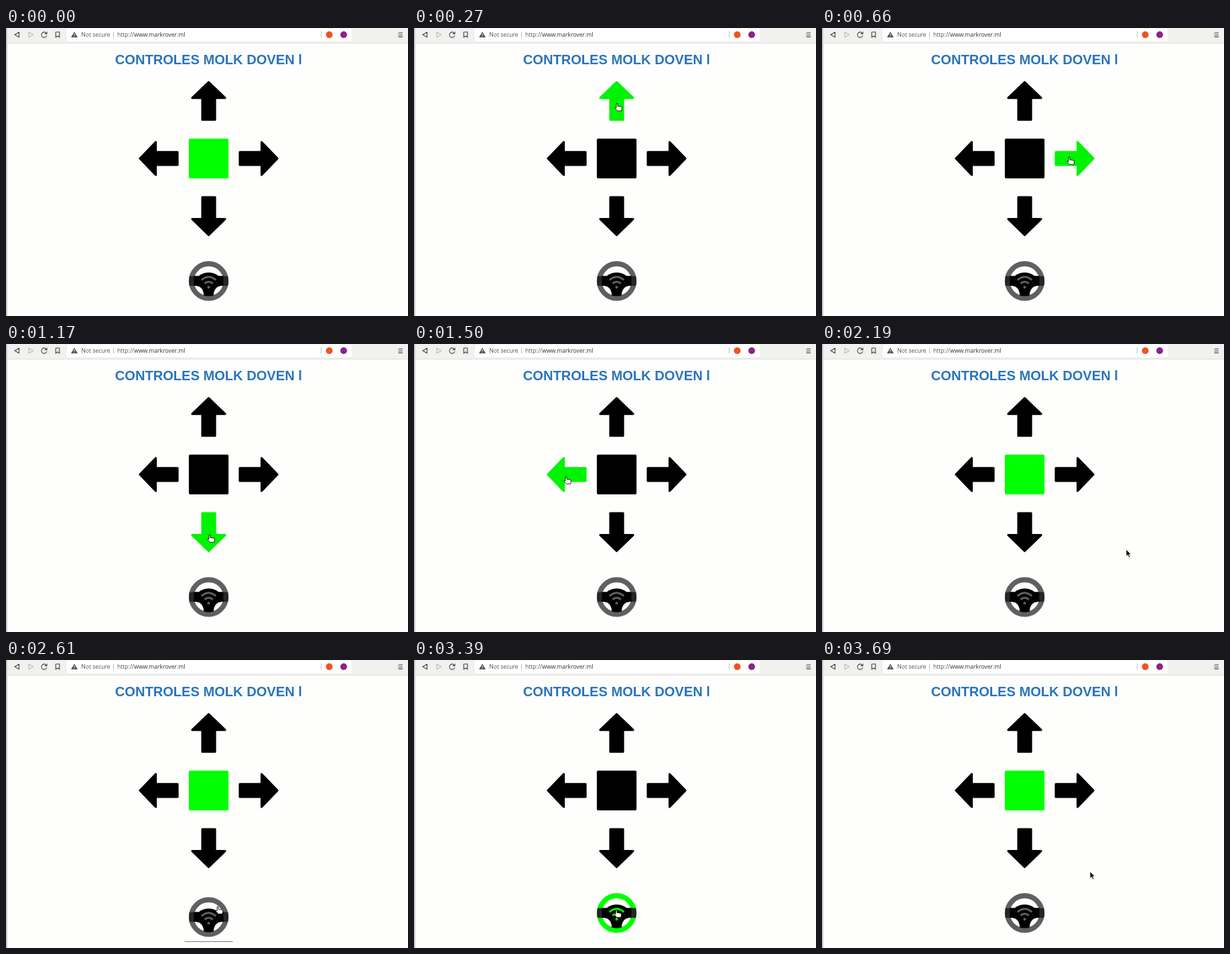
These frames come from a looping animation (600 px wide and 429 px high, 3900 ms). An HTML page:

```html
<!DOCTYPE html>
<html lang="es">
<head>
<meta charset="utf-8">
<title>Controles</title>
<style>
  html, body { margin: 0; width: 100%; height: 100%; overflow: hidden; background: #fefefd; }
  svg { display: block; width: 600px; height: 429px; }
  .bar { font: 8.6px "Open Sans", "Noto Sans", sans-serif; }
  .title { font: bold 20.1px "Liberation Sans", Arial, sans-serif; fill: #2a74bd; text-anchor: middle; }
  .icon { fill: none; stroke: #444; stroke-width: 1.1; stroke-linejoin: round; }
  .arrow { stroke: currentColor; stroke-width: 3; stroke-linejoin: round; }
  .btn { color: #000; fill: currentColor; }
  .btn.on { color: #00f300; }
  #wheel { color: #606060; }
  #stop.on, #wheel.on { color: #0f0; }
  .line { stroke: #777; visibility: hidden; }
  .hover .line { visibility: visible; }
  .hover .face { transform: translateY(6px); }
  .ring { fill: none; stroke: currentColor; }
</style>
</head>
<body>
<svg viewBox="0 0 600 429">
  <defs>
    <path id="arrowShape" class="arrow" d="M-28-9.6H4.5V-24.6L28.2 0 4.5 24.6V9.6H-28Z"/>
    <path id="underline" d="M-36 42.5H36"/>
  </defs>

  <rect width="600" height="429" fill="#fefefd"/>
  <rect width="600" height="22.5" fill="#f1f1f0"/>
  <path d="M0 22.5H600" stroke="#dededd"/>
  <rect width="1.5" height="429" fill="#b4b4b4"/>
  <rect x="1.5" width="1" height="429" fill="#e4e4e3"/>
  <rect x="91" y="1" width="425" height="18.5" rx="3" fill="#fff"/>

  <g class="icon">
    <path d="M19.5 6.2V13.8L13 10Z"/>
    <path d="M34 6.2V13.8L40.5 10Z" stroke="#bbb"/>
    <path d="M60.3 8A4 4 0 1 0 60.8 11M61 5.5V8.6H57.8"/>
    <path d="M74.2 6H79.8V14L77 11.6 74.2 14Z"/>
    <path d="M585.5 7.3H592M585.5 10.2H592M585.5 13.1H592"/>
    <path d="M160.5 5.5V14.5M470.5 5.5V14.5" stroke="#bbb" stroke-width="1"/>
  </g>
  <path d="M102 5.5L107 14H97Z" fill="#555"/>
  <path d="M102 8.3V11M102 12V13" stroke="#fff"/>
  <g class="bar">
    <text x="112.3" y="13.3" fill="#555">Not secure</text>
    <text x="166" y="13.3" fill="#333"><tspan fill="#555">http://</tspan>www.markrover.ml</text>
  </g>
  <circle cx="482.5" cy="10" r="5" fill="#f4511e"/>
  <circle cx="504" cy="10" r="5" fill="#8a2387"/>

  <text class="title" x="302.3" y="54.3">CONTROLES MOLK DOVEN l</text>

  <g id="up" class="btn">
    <g class="face"><use href="#arrowShape" transform="rotate(-90)"/></g>
  </g>
  <g id="left" class="btn">
    <g class="face"><use href="#arrowShape" transform="rotate(180)"/></g>
  </g>
  <g id="stop" class="btn">
    <g class="face"><rect x="-29.6" y="-29.6" width="59.2" height="59.2" rx="2"/></g>
  </g>
  <g id="right" class="btn">
    <g class="face"><use href="#arrowShape"/></g>
  </g>
  <g id="down" class="btn">
    <g class="face"><use href="#arrowShape" transform="rotate(90)"/></g>
  </g>
  <g id="wheel" class="btn">
    <g class="face">
      <circle class="ring" r="25.8" stroke-width="7.6"/>
      <path d="M-28.6-7.5H28.6Q30.5 0 28.6 7H-28.6Q-30.5 0-28.6-7.5Z" fill="#262626"/>
      <path d="M-22-7.5H-15Q-8-12.6 0-12.6T15-7.5H22V7H19Q8 8 7.3 21.5Q0 23.5-7.3 21.5Q-8 8-19 7H-22Z" fill="#000"/>
      <path class="ring" d="M-10.6-1.6Q0-10.8 10.6-1.6M-6.2 3.7Q0-1.6 6.2 3.7" stroke-width="3"/>
      <circle cy="9" r="2"/>
    </g>
  </g>

  <g id="pointer">
    <path id="tip" d="M0 0V10.3L2.4 8.2 4.1 12 5.9 11.2 4.2 7.5H7.4Z" fill="#111" stroke="#fff" stroke-width=".7"/>
    <path id="hand" d="M-1 .8Q0-.6 1 .8V4.3L6.2 5.2Q7.6 5.6 7.5 7L6.8 11.4H.6L-3.2 7.2Q-3.4 5.4-1 6.9Z" fill="#fff" stroke="#111" stroke-width=".9" stroke-linejoin="round"/>
  </g>
</svg>

<script>
const LOOP = 3900, TICK = 30, REACH = 33;
const MID = { x: 302.5, y: 194.4 }, GAP = { x: 74.4, y: 85.7 };
const $ = id => document.getElementById(id);

// controls sit on a cross around the middle, the wheel below it
const cell = (col, row) => ({ x: MID.x + col * GAP.x, y: MID.y + row * GAP.y });
const centers = {
  up: cell(0, -1), left: cell(-1, 0), stop: cell(0, 0),
  right: cell(1, 0), down: cell(0, 1), wheel: cell(0, 2.13)
};

for (const [id, { x, y }] of Object.entries(centers)) {
  $(id).setAttribute("transform", `translate(${x} ${y})`);
  $(id).insertAdjacentHTML("beforeend", '<use class="line" href="#underline"/>');
}

// where the pointer rests, and when; resting on a control presses it
const rest = (from, to, x, y) => ({ from, to, x, y });
const rests = [
  rest(60, 60, 523, 278),
  rest(270, 330, 303, 112),
  rest(450, 660, 369, 192),
  rest(960, 1170, 304, 284),
  rest(1470, 1680, 227, 197),
  rest(1890, 1980, 303, 195),
  rest(2190, 2220, 454, 306),
  rest(2400, 2400, 497, 300),
  rest(2760, 3390, 302, 372),
  rest(3450, 3450, 305, 372),
  rest(3600, 3600, 497, 325),
  rest(3690, LOOP, 400, 315)
];

const easeOut = k => 1 - (1 - k) ** 3;

function controlAt({ x, y }) {
  return Object.keys(centers).find(id =>
    Math.abs(x - centers[id].x) < REACH && Math.abs(y - centers[id].y) < REACH);
}

function pointerAt(t) {
  const i = rests.findLastIndex(r => r.from <= t);
  if (i < 0) return null;
  const a = rests[i], b = rests[i + 1];
  if (t <= a.to) return a;
  const k = easeOut((t - a.to) / (b.from - a.to));
  return { x: a.x + (b.x - a.x) * k, y: a.y + (b.y - a.y) * k };
}

// pressing the active control again goes back to stop
function activeAt(t) {
  return rests.filter(r => r.from <= t).map(controlAt).filter(Boolean)
    .reduce((active, id) => id === active ? "stop" : id, "stop");
}

function draw(now) {
  const t = Math.floor(now % LOOP / TICK) * TICK;
  const active = activeAt(t), pos = pointerAt(t);
  const over = pos && controlAt(pos);
  for (const id in centers) {
    $(id).classList.toggle("on", id === active);
    $(id).classList.toggle("hover", id === over && id !== active);
  }
  $("pointer").style.display = pos ? "" : "none";
  if (pos) $("pointer").setAttribute("transform", `translate(${pos.x} ${pos.y})`);
  $("hand").style.display = over ? "" : "none";
  $("tip").style.display = over ? "none" : "";
}

const start = performance.now();
function frame() {
  draw(performance.now() - start);
  requestAnimationFrame(frame);
}
frame();
</script>
</body>
</html>
```
